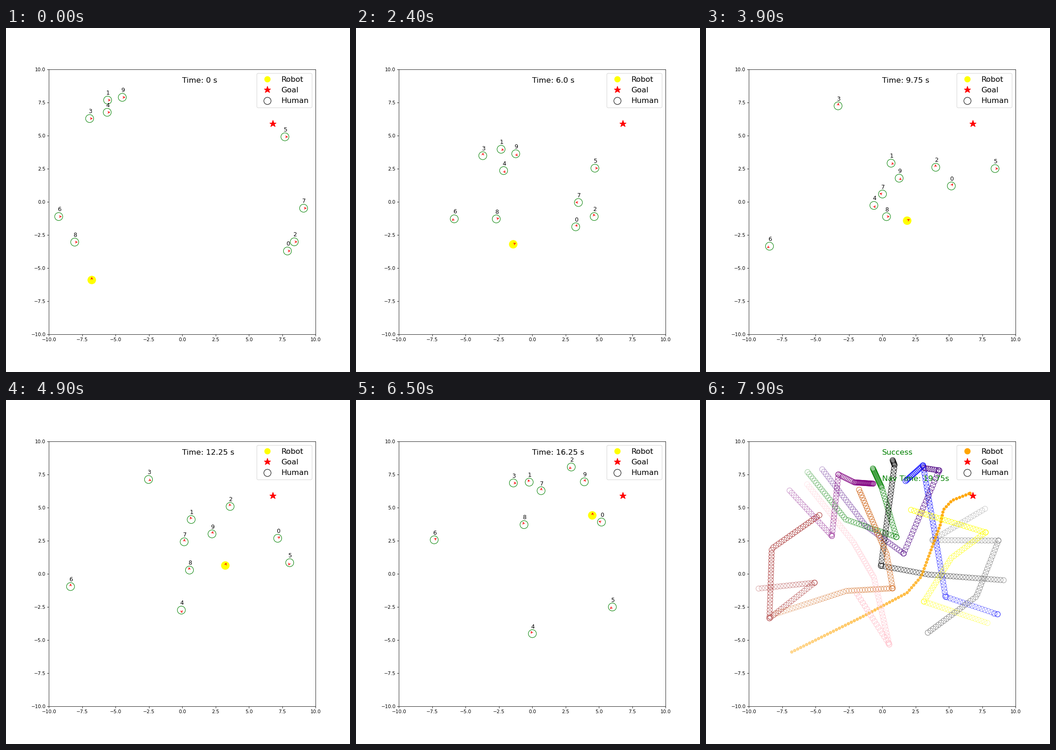
A matplotlib script that plays this animation: 748 px wide and 748 px high, repeating every 8 s.

```python
import numpy as np
import matplotlib.pyplot as plt
from matplotlib.animation import FuncAnimation
from matplotlib.lines import Line2D
from matplotlib.patches import ArrowStyle, Circle, FancyArrowPatch

SIZE = 748
FRAMES = 80
STEPS = FRAMES - 1          # moving states; the last frame is the summary
TIME_STEP = 0.25
SPEED = 1.0
RADIUS = 0.3
LIMIT = 10
GOAL = (6.8, 5.9)


def stroll(*points):
    """Walk through the points at constant speed and stop at the last one."""
    points = np.array(points)
    lengths = np.hypot(*np.diff(points, axis=0).T)
    reached = np.concatenate([[0], np.cumsum(lengths)])
    travelled = np.arange(STEPS) * TIME_STEP * SPEED
    return np.column_stack([np.interp(travelled, reached, axis) for axis in points.T])


def errand(*stops):
    """Walk straight between (step, x, y) stops, hesitating a step around sharp turns."""
    stops = np.array(stops)
    keys = [stops[0]]
    for before, stop, after in zip(stops, stops[1:], stops[2:]):
        arriving, leaving = (stop - before)[1:], (after - stop)[1:]
        cosine = arriving @ leaving / np.linalg.norm(arriving) / np.linalg.norm(leaving)
        keys += [stop - (1, 0, 0), stop + (1, 0, 0)] if cosine < 0.5 else [stop]
    when, x, y = np.array(keys + [stops[-1]]).T
    steps = np.arange(STEPS)
    return np.column_stack([np.interp(steps, when, x), np.interp(steps, when, y)])


robot_path = stroll((-6.79, -5.91), (-1.44, -3.22), (1.85, -1.45), (2.92, -0.22),
                    (4.37, 3.74), (4.58, 4.82), (5.23, 5.53), (6.58, 6.07))

humans = [
    ("yellow", errand((0, 7.89, -3.72), (22, 3.13, -2.1), (39, 5.18, 1.19),
                      (53, 7.75, 3.12), (78, 2.16, 4.82))),
    ("green", errand((0, -5.6, 7.67), (22, -2.74, 4.1), (42, 1.06, 2.77),
                     (60, -0.05, 6.52), (78, -0.7, 7.94))),
    ("blue", errand((0, 8.4, -3.03), (2, 8.65, -3.06), (20.5, 4.75, -1.74),
                    (62.5, 3.06, 8.18), (78, 1.75, 7.0))),
    ("purple", errand((0, -6.95, 6.28), (20.5, -3.78, 2.85), (41, -3.29, 7.49),
                      (53, -2.1, 6.9), (78, -0.68, 6.8))),
    ("pink", errand((0, -5.63, 6.75), (24, -2.15, 2.35), (39, -0.63, -0.28),
                    (60.5, 0.52, -5.34), (78, -1.9, -1.5))),
    ("gray", errand((0, 7.7, 4.9), (19.3, 3.77, 2.54), (41, 8.71, 2.5),
                    (59.7, 7.06, -1.72), (78, 3.42, -4.45))),
    ("brown", errand((0, -9.27, -1.12), (19, -5.08, -0.68), (38.5, -8.46, -3.36),
                     (60.4, -8.29, 1.9), (78, -4.72, 4.42))),
    ("black", errand((0, 9.1, -0.49), (24, 3.46, -0.06), (40.5, -0.1, 0.6),
                     (73, 0.92, 8.2), (78, 0.78, 8.57))),
    ("chocolate", errand((0, -8.07, -3.05), (24, -2.7, -1.3), (42.3, 0.78, -1.1),
                         (54, 0.33, 1.48), (78, -1.74, 6.34))),
    ("indigo", errand((0, -4.5, 7.88), (24, -1.24, 3.62), (42, 1.6, 1.53),
                      (69.5, 4.27, 7.8), (78, 3.13, 7.98))),
]

fig, ax = plt.subplots(figsize=(10, 10), dpi=SIZE / 10)
fig.subplots_adjust(left=0.1249)    # keeps the left spine on a whole pixel
ax.set(xlim=(-LIMIT, LIMIT), ylim=(-LIMIT, LIMIT))


def legend_mark(marker, size, color, label, face="auto"):
    return Line2D([], [], color=color, marker=marker, linestyle="None",
                  markersize=size, markerfacecolor=face, label=label)


legend = ax.legend(handles=[
    legend_mark("o", 12, "yellow", "Robot"),
    legend_mark("*", 15, "red", "Goal"),
    legend_mark("o", 15, "black", "Human", "none"),
], fontsize=16, loc="upper right")
ax.plot(*GOAL, color="red", marker="*", markersize=15, linestyle="None")

paths = [robot_path] + [path for _, path in humans]
bodies = [Circle(robot_path[0], RADIUS, color="yellow")]
bodies += [Circle(path[0], RADIUS, fill=False, edgecolor="green") for _, path in humans]
head = ArrowStyle("->", head_length=4, head_width=2)
arrows = [FancyArrowPatch((0, 0), (1, 0), color="red", arrowstyle=head) for _ in paths]
for patch in bodies + arrows:
    ax.add_patch(patch)
numbers = [ax.text(0, 0, str(i), color="black", fontsize=12) for i in range(len(humans))]
clock = ax.text(0, 9, "", fontsize=16)
live = bodies + arrows + numbers + [clock]

summary = [ax.text(0, 9, "Success", color="green", fontsize=16),
           ax.text(0, 7, f"Nav Time: {STEPS * TIME_STEP}s", color="green", fontsize=16)]
for step in range(STEPS):
    alpha = 0.4 + 0.6 * step / (STEPS - 1)
    trail = [Circle(robot_path[step], 0.1, color="orange", alpha=alpha)]
    trail += [Circle(path[step], 0.2, fill=False, edgecolor=color, alpha=alpha)
              for color, path in humans]
    for patch in trail:
        ax.add_patch(patch)
    summary += trail


def heading(path, step):
    """Direction of the latest move, kept while standing still."""
    while step > 1 and np.allclose(path[step], path[step - 1]):
        step -= 1
    if step == 0:
        return np.pi / 2 if path is robot_path else 0
    dx, dy = path[step] - path[step - 1]
    return np.arctan2(dy, dx)


def update(frame):
    done = frame == STEPS
    for artist in live:
        artist.set_visible(not done)
    for artist in summary:
        artist.set_visible(done)
    legend.legend_handles[0].set_color("orange" if done else "yellow")
    if done:
        return
    for path, body, arrow in zip(paths, bodies, arrows):
        center = path[frame]
        angle = heading(path, frame)
        body.center = center
        arrow.set_positions(center, center + RADIUS * np.array([np.cos(angle), np.sin(angle)]))
    for number, (_, path) in zip(numbers, humans):
        number.set_position(path[frame] + (-0.1, 0.4))
    clock.set_text(f"Time: {frame * TIME_STEP if frame else 0} s")


animation = FuncAnimation(fig, update, frames=FRAMES, init_func=lambda: update(0),
                          interval=100, repeat=True, repeat_delay=0, blit=False)
plt.show()
```
